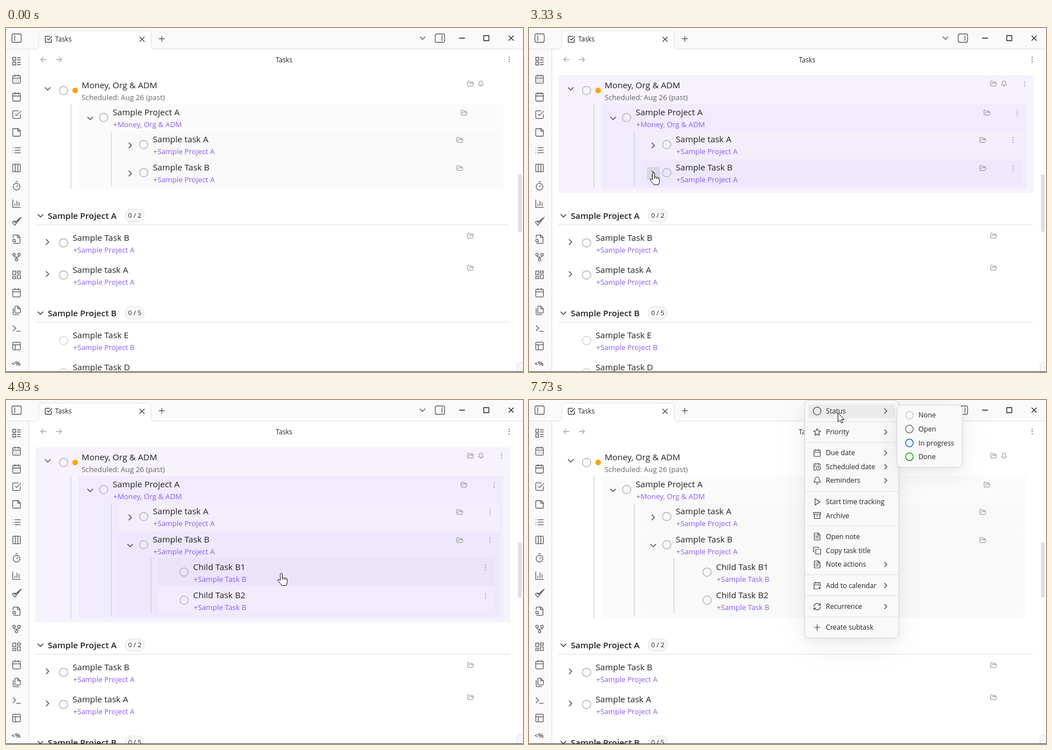
An HTML page that plays this animation: 916 by 611 pixels, repeating every 8 s.

```html
<!DOCTYPE html>
<html lang="en">
<head>
<meta charset="utf-8">
<title>Tasks</title>
<style>
html, body { margin: 0; width: 100%; height: 100%; overflow: hidden; background: #fff; }
svg { display: block; width: 916px; height: 611px; font-family: "Open Sans", "Noto Sans", sans-serif; }
.panel { filter: drop-shadow(0 3px 6px rgba(0, 0, 0, .05)) drop-shadow(0 12px 24px rgba(0, 0, 0, .07)); }
</style>
</head>
<body>
<svg id="stage" viewBox="0 0 916 611"></svg>
<script>
const LOOP = 8000, STEP = 1000 / 15;
const EXPAND = 3530, MENU = 5930, SUBMENU = 7530;
const INK = '#222', GREY = '#5c5c5c', PURPLE = '#8a5cf5';
const stage = document.getElementById('stage');

// pointer path: time, x, y
const PATH = [
  [400, 31, 4], [530, 95, 5], [600, 95, 5], [1000, 180, 36], [1330, 273.5, 58], [1470, 440, 136],
  [1530, 450, 150], [1900, 410, 318], [2330, 383, 270], [2400, 371, 263], [2800, 285, 262],
  [3200, 214, 256], [3330, 221, 257], [3930, 221, 257], [4400, 327, 360], [4660, 500, 330],
  [4800, 461, 290], [4930, 488, 308], [6470, 488, 308], [6900, 535, 150], [7330, 547, 22.5], [LOOP, 547, 22.5]
];

// icons on a 24 unit grid
const box = (x, y, w, h = w) => `M${x} ${y}h${w}v${h}h${-w}z`;
const ring = (x, y, r) => `M${x - r} ${y}a${r} ${r} 0 1 0 ${2 * r} 0a${r} ${r} 0 1 0 ${-2 * r} 0`;
const frame = 'M5 3h14a2 2 0 0 1 2 2v14a2 2 0 0 1-2 2H5a2 2 0 0 1-2-2V5a2 2 0 0 1 2-2z';
const calendar = 'M8 2v4M16 2v4M3 10h18M5 4h14a2 2 0 0 1 2 2v14a2 2 0 0 1-2 2H5a2 2 0 0 1-2-2V6a2 2 0 0 1 2-2z';
const cutCalendar = 'M8 2v4M16 2v4M3 10h6M21 8V6a2 2 0 0 0-2-2H5a2 2 0 0 0-2 2v14a2 2 0 0 0 2 2h4';
const note = 'M15 2H6a2 2 0 0 0-2 2v16a2 2 0 0 0 2 2h12a2 2 0 0 0 2-2V7zM14 2v6h6';
const ICON = {
  agenda: box(3, 3, 7) + box(3, 14, 7) + 'M14 4h7M14 9h7M14 15h7M14 20h7',
  days: calendar + 'M8 14h.1M12 14h.1M16 14h.1M8 18h.1M12 18h.1M16 18h.1',
  calendar,
  check: 'M9 11l3 3L22 4M21 12v7a2 2 0 0 1-2 2H5a2 2 0 0 1-2-2V5a2 2 0 0 1 2-2h11',
  sticky: 'M16 3H5a2 2 0 0 0-2 2v14a2 2 0 0 0 2 2h14a2 2 0 0 0 2-2V8zM15 3v6h6',
  list: 'M8 6h13M8 12h13M8 18h13M3 6h.1M3 12h.1M3 18h.1',
  columns: frame + 'M9 3v18M15 3v18',
  timer: 'M10 2h4M12 14l3-3' + ring(12, 14, 8),
  chart: 'M3 3v18h18M8 17v-4M13 17V6M18 17V9',
  ticks: 'M2 14l6 7L23 2 9 15l-3-4zM8 11l2 2L20 4',
  search: 'M14 2v6h6M5 21.5 18 22a2 2 0 0 0 2-2V7l-5-5H6a2 2 0 0 0-2 2v4M9.5 18.5 8 17' + ring(6, 15, 3),
  fork: ring(6, 6, 3) + ring(18, 6, 3) + ring(12, 18, 3) + 'M18 9v1a2 2 0 0 1-2 2H8a2 2 0 0 1-2-2V9M12 12v3',
  board: box(3, 3, 7, 9) + box(14, 3, 7, 5) + box(14, 12, 7, 9) + box(3, 16, 7, 5),
  files: 'M15 2h-5a2 2 0 0 0-2 2v12a2 2 0 0 0 2 2h9a2 2 0 0 0 2-2V8zM15 2v6h6M4 7v13a2 2 0 0 0 2 2h11',
  terminal: 'M4 18l6-6-6-6M12 19h9',
  layout: frame + 'M3 9h18M9 21V9',
  folder: 'M6 14l1.5-2.9A2 2 0 0 1 9.2 10H20a2 2 0 0 1 2 2.5l-1.6 6A2 2 0 0 1 18.5 20H4a2 2 0 0 1-2-2V5a2 2 0 0 1 2-2h4l2.4 3H18a2 2 0 0 1 2 2v2',
  bell: 'M10.3 21a1.9 1.9 0 0 0 3.4 0M3.3 15.3A1 1 0 0 0 4 17h16a1 1 0 0 0 .7-1.7C19.4 14 18 12.5 18 8A6 6 0 0 0 6 8c0 4.5-1.4 6-2.7 7.3',
  right: 'M9 18l6-6-6-6', down: 'M6 9l6 6 6-6',
  x: 'M5 5l14 14M19 5 5 19', plus: 'M4 12h16M12 4v16', minus: 'M4 12h16', square: box(4, 4, 16),
  back: 'M12 19l-7-7 7-7M5 12h15', forward: 'M12 5l7 7-7 7M19 12H4',
  circle: ring(12, 12, 11),
  star: 'M12 2l3 6.3 7 1-5 4.9 1.2 6.9L12 17.8l-6.2 3.3L7 14.2 2 9.3l7-1z',
  clock: cutCalendar + ring(16, 16, 6) + 'M16 13.5v2.7l1.8 1',
  play: 'M6 3l14 9-14 9z',
  archive: box(2, 3, 20, 5) + 'M4 8v12h16V8M10 12h4',
  note: note + 'M8 12h8M8 16h8M8 8h2',
  copy: box(8, 8, 14) + 'M4 16H2V2h14v2',
  calPlus: cutCalendar + 'M9 10h12v4M9 22h4M16 19h6M19 16v6',
  repeat: 'M3 12a9 9 0 0 1 15-6.7L21 8M21 3v5h-5M21 12a9 9 0 0 1-15 6.7L3 16M3 21v-5h5'
};
const RIBBON = 'agenda days calendar check sticky list columns timer chart ticks search fork board calendar files terminal layout'.split(' ');

// label, y, icon, has submenu
const ITEMS = [
  ['Status', 19.5, 'circle', 1], ['Priority', 57, 'star', 1], ['Due date', 94, 'calendar', 1],
  ['Scheduled date', 118.5, 'clock', 1], ['Reminders', 143, 'bell', 1], ['Start time tracking', 181, 'play'],
  ['Archive', 205.5, 'archive'], ['Open note', 242.5, 'note'], ['Copy task title', 267.5, 'copy'],
  ['Note actions', 292, 'note', 1], ['Add to calendar', 329.5, 'calPlus', 1],
  ['Recurrence', 367, 'repeat', 1], ['Create subtask', 404, 'plus']
];

const rect = (x, y, x2, y2, fill, more = '') =>
  `<rect x="${x}" y="${y}" width="${x2 - x}" height="${y2 - y}" fill="${fill}" ${more}/>`;
const line = (d, color = '#e0e0e0', w = 1) => `<path d="${d}" fill="none" stroke="${color}" stroke-width="${w}"/>`;
const text = (x, y, s, size, fill = INK, weight = 400) =>
  `<text x="${x}" y="${y}" font-size="${size}" fill="${fill}" font-weight="${weight}">${s}</text>`;
const icon = (name, x, y, size = 18, color = GREY, w = 1.3) =>
  `<path transform="translate(${x - size / 2} ${y - size / 2}) scale(${size / 24})" d="${ICON[name]}" fill="none" stroke="${color}" stroke-width="${w * 24 / size}" stroke-linecap="round" stroke-linejoin="round"/>`;
const circle = (x, y, r, fill, stroke = 'none', w = 1.7) =>
  `<circle cx="${x}" cy="${y}" r="${r}" fill="${fill}" stroke="${stroke}" stroke-width="${w}"/>`;
const dots = (x, y, color = '#999') => [-4, 0, 4].map(d => circle(x, y + d, 1, color)).join('');
const folder = (x, y) => icon('folder', x, y, 12.5, '#888', 1);
const chevron = (name, x, y) => icon(name, x, y, 18, '#444', 1.4);
const inside = (p, x, y, x2, y2) => p.x >= x && p.x < x2 && p.y >= y && p.y < y2;

const task = (x, y, title, parent, ringColor = '#bdbdbd') =>
  circle(x - 16, y + 4, 7.4, 'none', ringColor) + text(x, y, title, 15.1) +
  text(x + 1, y + 21, `+<tspan fill="${PURPLE}">${parent}</tspan>`, 12.9, '#777');

function heading(y, title, count) {
  return icon('down', 61, y, 18, '#333', 1.4) + text(74, y + 5.5, title, 15, INK, 600) +
    rect(211.5, y - 11.5, 244.5, y + 10.5, '#f7f7f7', 'rx="9" stroke="#e0e0e0"') +
    text(216.5, y + 3.7, count, 11.5) + line(`M52 ${y + 16}H893`);
}

function chrome(open) {
  let s = rect(0, 0, 916, 38, '#fafafa') + rect(0, 38, 40, 611, '#fafafa') +
    '<path d="M52 38q6 0 6-6V11q0-6 6-6H251q6 0 6 6V32q0 6 6 6z" fill="#fff"/>' +
    line('M0 37.5H52q6 0 6-6V11q0-6 6-6H251q6 0 6 6V31.5q0 6 6 6H916M40.5 38V611');
  s += [[10, 15.5], [760, 772.5]].map(([x, bar]) =>
    rect(x + .5, 10.5, x + 17, 25.5, 'none', `rx="3" stroke="${GREY}" stroke-width="1.3"`) +
    line(`M${bar} 13V23`, GREY, 1.3)).join('');
  s += icon('check', 75, 20, 14.5, '#333') + text(87, 24, 'Tasks', 11.7) + icon('x', 241, 20, 14, '#444') +
    icon('plus', 276, 19, 14, GREY) + icon('down', 738, 18, 18, GREY) +
    icon('minus', 808, 18, 14, INK) + icon('square', 851, 18, 13.5, INK) + icon('x', 895, 18, 14, INK) +
    icon('back', 66, 56, 15, '#aaa') + icon('forward', 94, 56, 15, '#aaa') +
    text(478, 60.5, 'Tasks', 11.7) + dots(891.5, 56, '#555');
  s += RIBBON.map((name, i) => icon(name, 18.7, 59 + i * 31.62)).join('') + text(9.5, 600, '&lt;%', 11.5, '#444', 600);
  return s + rect(907, open ? 253 : 260, 914, open ? 351 : 362, '#e0e0e0', 'rx="2"');
}

function content(p, open, overMenu) {
  const drop = open ? 102 : 0;
  const hover = (...area) => !overMenu && inside(p, ...area);
  const top = hover(52, 84, 893, 293 + drop);
  const fill = (on, plain, lit, tinted) => on ? lit : top ? tinted : plain;
  const mid = hover(128, 135, 881, 286 + drop);
  const rowA = hover(199, 184, 874, 234), rowB = hover(199, 234, 874, 281 + drop);
  let s = top ? rect(52, 84, 893, 293 + drop, '#f6f2fe') : '';
  s += rect(128, 135, 881, 285 + drop, fill(mid, '#fbfbfb', '#f1ecfd', '#f3effc')) +
    rect(199, 184, 874, 233, fill(rowA, '#f9f9f9', '#ede8fb', '#f2eefa')) +
    rect(199, 234, 874, 281 + drop, fill(rowB, '#f9f9f9', '#ede8fb', '#f2eefa'));
  if (open) {
    for (const y of [281, 332])
      s += rect(270, y, 866, y + 48, fill(hover(335, y, 866, y + 48), '#f9f9f9', '#eae3f9', '#f1ecfc'));
    s += line('M257 281V380', '#d6d6d9', 1.5);
  }
  s += line(`M115 135V${286 + drop}M186.5 184V${281 + drop}`, '#d6d6d9', 1.5);
  if (hover(209, 247, 232, 270)) s += rect(209, 247, 232, 270, '#dbd6e6', 'rx="4"');

  s += chevron('down', 74, 108) + circle(102, 111, 7.4, 'none', '#bdbdbd') + circle(122.5, 111, 5, '#ffa500') +
    text(134, 106.5, 'Money, Org &amp; ADM', 15.1) + text(134, 127.5, 'Scheduled: Aug 26 (past)', 12.9, '#666') +
    chevron('down', 149, 160.5) + task(189, 155, 'Sample Project A', 'Money, Org &amp; ADM') +
    chevron('right', 220, 208.5) + task(260, 203, 'Sample task A', 'Sample Project A') +
    chevron(open ? 'down' : 'right', 220, 258.5) + task(260, 253, 'Sample Task B', 'Sample Project A') +
    folder(823, 99) + icon('bell', 841.5, 99, 12, '#888', 1) + folder(811.5, 150.5) + folder(804, 199) + folder(804, 249);
  if (open) s += task(331.5, 301.7, 'Child Task B1', 'Sample Task B') + task(331.5, 351.5, 'Child Task B2', 'Sample Task B');
  if (top) {
    s += dots(878, 99) + dots(865, 151) + dots(857.5, 199) + dots(857.5, 249);
    if (open) s += dots(849.5, 297) + dots(849.5, 348);
  }
  return s + `<g transform="translate(0 ${drop})">` +
    heading(333.5, 'Sample Project A', '0 / 2') +
    chevron('right', 73.5, 380) + task(118, 377.7, 'Sample Task B', 'Sample Project A') + folder(823, 369) +
    chevron('right', 73.5, 437) + task(118, 434.7, 'Sample task A', 'Sample Project A') + folder(823, 426) +
    heading(506.5, 'Sample Project B', '0 / 5') +
    task(118, 551.2, 'Sample Task E', 'Sample Project B', '#d9d9d9') +
    task(118, 608.2, 'Sample Task D', 'Sample Project B', '#d9d9d9') + '</g>';
}

function menu(p) {
  let s = rect(488.5, .5, 655, 422.5, '#f9f9f9', 'rx="8" stroke="#d4d4d4" class="panel"') +
    [38, 75, 162, 223, 310, 347, 385].map(y => line(`M489 ${y + .5}H654.5`)).join('');
  for (const [label, y, name, more] of ITEMS) {
    if (inside(p, 495, y - 12, 649, y + 12.5)) s += rect(495, y - 12, 649, y + 12.5, '#ebebeb', 'rx="4"');
    s += icon(name, 510.5, y, 15, '#444', 1.2) + text(526, y + 4.3, label, 12.15);
    if (more) s += icon('right', 632, y, 16, '#444');
  }
  return s;
}

function submenu() {
  const states = [['None', '#ccc'], ['Open', '#777'], ['In progress', '#2368d8'], ['Done', '#12a812']];
  return rect(652, 9, 768, 119.5, '#f9f9f9', 'rx="8" stroke="#d4d4d4" class="panel"') +
    states.map(([label, color], i) => {
      const y = 27 + i * 24.6;
      return circle(674, y, 6.8, 'none', color, 1.5) + text(690, y + 4.3, label, 12.15);
    }).join('');
}

function pointer(p, hand) {
  const d = hand
    ? 'M-2 12.5V1.8a1.8 1.8 0 0 1 3.6 0V8q1.8-1.2 3.2.4q1.8-.8 3 .7q2.2-.6 2.4 1.6V15q0 3-2 6.5H.5q-1.5-3-4-5.5l-2.8-3.5q-.7-2 1.5-1.8z'
    : 'M.5.5V16.5L4.2 13 6.6 18.4 9 17.4 6.7 12H11.6Z';
  return `<path transform="translate(${p.x} ${p.y})" d="${d}" fill="#fff" stroke="#111" stroke-linejoin="round"/>` +
    (hand ? `<path transform="translate(${p.x} ${p.y})" d="M1.6 8v3M4.8 8.6v2.6M7.8 9.4v2" stroke="#111"/>` : '');
}

function locate(t) {
  const i = PATH.findIndex(k => k[0] > t);
  if (i < 1) return { x: -99, y: -99 };
  const [a, x, y] = PATH[i - 1], [b, x2, y2] = PATH[i], k = (t - a) / (b - a);
  return { x: x + (x2 - x) * k, y: y + (y2 - y) * k };
}

function render(t) {
  const p = locate(t), open = t >= EXPAND, hasMenu = t >= MENU;
  const overMenu = hasMenu && inside(p, 490, 0, 655, 423);
  stage.innerHTML = content(p, open, overMenu) + chrome(open) +
    rect(905.5, 594.5, 930, 630, '#f6f6f6', 'rx="5" stroke="#dcdcdc"') + rect(0, 610, 916, 611, '#444') +
    (hasMenu ? menu(p) : '') + (t >= SUBMENU ? submenu() : '') +
    pointer(p, p.y > 84 && !overMenu);
}

let last = -1;
function tick() {
  const n = Math.floor((performance.now() % LOOP + 4) / STEP);
  if (n !== last) render(Math.min((last = n) * STEP, LOOP - 1));
  requestAnimationFrame(tick);
}
tick();
</script>
</body>
</html>
```
